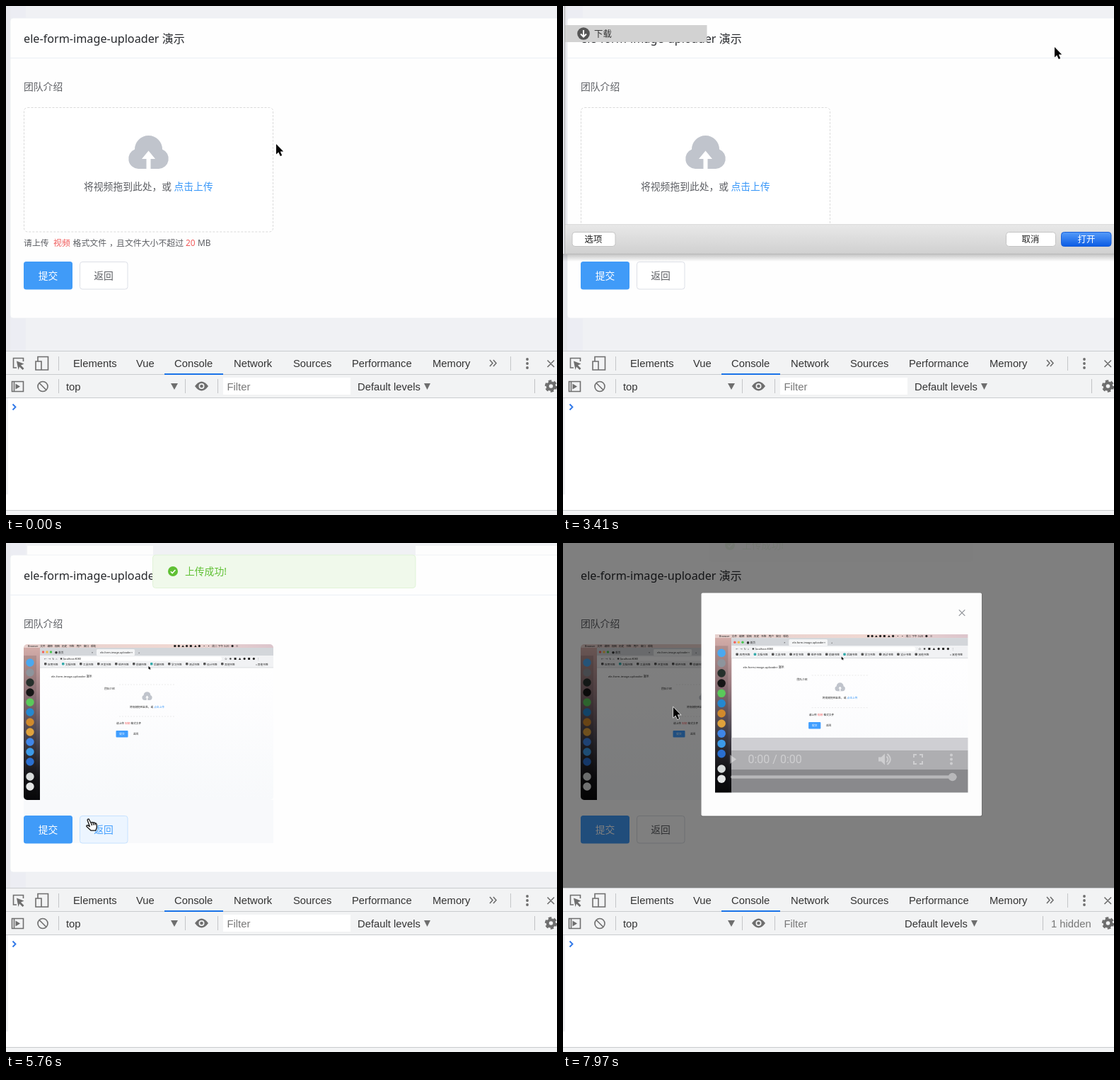
These frames come from a looping animation (779 px wide and 719 px high, 8000 ms). An HTML page:

```html
<!DOCTYPE html>
<html lang="zh-CN">
<head>
<meta charset="utf-8">
<title>ele-form-image-uploader 演示</title>
<style>
html, body { margin: 0; width: 100%; height: 100%; overflow: hidden; background: #fff; }
svg { display: block; width: 779px; height: 719px; }
text { font: 13.8px "Noto Sans", "Noto Sans CJK SC", "Noto Sans CJK", sans-serif; fill: #5c5e63; white-space: pre; }
.title { font-size: 16.2px; fill: #26282c; }
.hint { font-size: 11.9px; }
.blue { fill: #3a98f8; }
.red { fill: #f05a5a; }
.mid { text-anchor: middle; }
.dev text { font: 14.8px "Liberation Sans", Arial, sans-serif; fill: #333; }
.sheet text { font: 12.4px Inter, "Noto Sans CJK SC", "Noto Sans CJK", sans-serif; fill: #555; }
.sheet .ink { fill: #222; }
.line { fill: none; stroke: #6e6e6e; stroke-width: 1.6; }
.tiny text { font-size: 3.7px; fill: #222; }
.video text { font: 16px Roboto, sans-serif; fill: #fff; }
</style>
</head>
<body>
<svg viewBox="0 0 779 719">
<defs>
  <linearGradient id="wall" x2="0" y2="1">
    <stop stop-color="#d3aca8"/><stop offset=".3" stop-color="#9c7d82"/>
    <stop offset=".6" stop-color="#4c4852"/><stop offset=".85" stop-color="#151519"/><stop offset="1" stop-color="#08080a"/>
  </linearGradient>
  <linearGradient id="paper" x2="0" y2="1"><stop stop-color="#fff"/><stop offset=".4" stop-color="#fdfdfe"/><stop offset="1" stop-color="#f7f9fb"/></linearGradient>
  <linearGradient id="menu"><stop stop-color="#e6cfcc"/><stop offset=".6" stop-color="#f0d8d2"/><stop offset="1" stop-color="#dcc5cc"/></linearGradient>
  <linearGradient id="shade" x2="0" y2="1">
    <stop stop-opacity="0"/><stop offset=".3" stop-opacity=".32"/><stop offset=".62" stop-opacity=".72"/><stop offset="1" stop-opacity=".94"/>
  </linearGradient>
  <linearGradient id="open" x2="0" y2="1"><stop stop-color="#559bf9"/><stop offset="1" stop-color="#0a5be4"/></linearGradient>
  <linearGradient id="bar" x2="0" y2="1"><stop stop-color="#e8e8e8"/><stop offset="1" stop-color="#d0d0d0"/></linearGradient>
  <linearGradient id="drop" x2="0" y2="1"><stop stop-opacity=".24"/><stop offset="1" stop-opacity="0"/></linearGradient>
  <clipPath id="round"><rect width="353" height="220" rx="5"/></clipPath>
  <g id="cloud">
    <path d="M-14.5 21.5A14.3 14.3 0 0 1-19.5-6A19.3 19.3 0 0 1 19.5-6A14.3 14.3 0 0 1 14.5 21.5Z" fill="#c0c4cc"/>
    <path d="M0-4L9.5 7.5H3V21.5H-3V7.5H-9.5Z" fill="#fff"/>
  </g>
  <g id="folder" fill="#ccc" stroke="#777">
    <path d="M21-5.5h5.5l2 2h9v9.5h-16.5z"/><path d="M21-1.5h16.5"/>
  </g>
  <g id="shot" class="tiny">
    <rect width="353" height="220" fill="url(#paper)"/>
    <rect y="4" width="23" height="216" fill="url(#wall)"/>
    <rect y="16" width="18" height="204" opacity=".12"/>
    <rect width="353" height="5" fill="url(#menu)"/>
    <rect x="23" y="5" width="330" height="11" fill="#d3d6da"/>
    <rect x="103" y="7" width="54" height="9" rx="1.5" fill="#f4f5f6"/>
    <rect x="23" y="16" width="330" height="17" fill="#f1f2f4"/>
    <rect x="58" y="17.5" width="222" height="6" rx="3" fill="#fff"/>
    <path d="M23 33H353" stroke="#d4d6d9" stroke-width=".8"/>
    <circle cx="27.5" cy="11" r="1.7" fill="#f4605a"/><circle cx="33" cy="11" r="1.7" fill="#f6bd3f"/><circle cx="38.5" cy="11" r="1.7" fill="#45c54d"/>
    <text x="6" y="4">Browser   文件   编辑   视图   历史   书签   用户   窗口   帮助</text>
    <text x="212" y="4">■  ●  ▲  ●  ■   ▲  ●   ▪   ▪   周二 下午 3:20   ●   ≡</text>
    <circle cx="46" cy="11.7" r="1.8" fill="#333"/><text x="49" y="13">首页</text>
    <text x="96" y="13">×</text><text x="108" y="13">ele-form-image-uploader</text><text x="152" y="13">×</text><text x="162" y="13">+</text>
    <text x="29" y="22">←  →  ↻  ⌂    ◉ localhost:8080</text>
    <text x="284" y="22">☆   ◉   ■   ▲   ●   ■   ●   ⋮</text>
    <g id="marks"></g>
    <g id="dock"></g>
    <path d="M176.500 31v4.500l1-1 1 1.500 .8-.4-.8-1.500h1.300z"/>
    <text x="39" y="47" style="font-size:4.1px">ele-form-image-uploader 演示</text>
    <text x="114" y="64">团队介绍</text>
    <path d="M135 57H215M135 102H215" stroke="#ddd" stroke-width=".6" stroke-dasharray="2 2"/>
    <use href="#cloud" transform="translate(174.500 73.500) scale(.25)"/>
    <text x="174.500" y="90" class="mid">将视频拖到此处，或 <tspan class="blue">点击上传</tspan></text>
    <text x="131" y="113">请上传 <tspan class="red">视频</tspan> 格式文件</text>
    <rect x="130.500" y="122" width="17" height="9.500" rx="1" fill="#409eff"/>
    <text x="139" y="128" class="mid" style="fill:#fff">提交</text>
    <text x="158.500" y="128" class="mid">返回</text>
  </g>
</defs>

<g id="page">
  <g id="back">
    <rect width="779" height="487" fill="#f0f1f4"/>
    <rect width="28" height="487" fill="#ecedf3"/>
    <rect width="6" height="487" fill="#e7e8ec"/>
    <g id="residue" fill="#fdfdfd"><rect x="30" y="4" width="178" height="13"/><rect x="579" y="4" width="200" height="13"/></g>
    <rect id="card" x="6" y="17" width="790" height="424" rx="4" fill="#fefefe" stroke="#ebeef2" stroke-width=".8"/>
    <path d="M6 73.500H779" stroke="#ebeef5"/>
  </g>
  <rect id="plain" width="779" height="487" fill="#fff"/>
  <text class="title" x="25" y="52">ele-form-image-uploader <tspan style="font-size:16px">演示</tspan></text>
  <text x="25" y="119">团队介绍</text>
  <rect id="drag" x="25.500" y="143.500" width="352" height="175.500" rx="5" fill="#fff" stroke-dasharray="3 2"/>
  <g id="pick">
    <use href="#cloud" x="201.500" y="208.500"/>
    <text x="110" y="260">将视频拖到此处，或</text><text x="237.500" y="260" class="blue">点击上传</text>
    <text class="hint" x="25" y="339">请上传</text><text class="hint red" x="67" y="339">视频</text>
    <text class="hint" x="94.500" y="339">格式文件</text><text class="hint" x="146" y="339">，</text>
    <text class="hint" x="156" y="339">且文件大小不超过</text><text class="hint red" x="254" y="339">20</text><text class="hint" x="271" y="339">MB</text>
  </g>
  <g id="ring" fill="none" stroke-width="6" transform="rotate(-90 201.500 225)">
    <circle cx="201.500" cy="225" r="57.500" stroke="#e5e9f2"/>
    <circle id="arc" cx="201.500" cy="225" r="57.500" stroke="#38a0f8" stroke-linecap="round" pathLength="100"/>
  </g>
  <text id="pct" class="mid" x="201.300" y="232" style="font-size:16.200px"></text>
  <g id="thumb">
    <rect id="pale" x="25" y="363" width="353" height="61" fill="#f8f9fb"/>
    <g transform="translate(25 143)" clip-path="url(#round)"><use href="#shot"/></g>
  </g>
  <g id="foot">
    <rect x="25" y="361" width="69" height="39.500" rx="3.500" fill="#409bf8"/>
    <text class="mid" x="59.500" y="386" style="fill:#fff;font-weight:500">提交</text>
    <rect id="ret" x="104.500" y="361.500" width="67.500" height="38.500" rx="3.500"/>
    <text id="retText" class="mid" x="138" y="386">返回</text>
  </g>
  <g id="cover"><rect x="208" y="32" width="371" height="32" fill="#fff"/></g>
  <g id="toast">
    <rect id="toastBox" x="207.500" y="17" width="371.500" height="46.500" rx="4"/>
    <circle cx="236" cy="40" r="7" fill="#5fc033"/><path d="M232.800 40.200l2.400 2.400 4.200-4.600" fill="none" stroke="#fff" stroke-width="1.500"/>
    <text x="253" y="45" style="fill:#5fc033;font-weight:500">上传成功!</text>
  </g>
</g>
<rect id="dim" width="779" height="487"/>

<g id="modal">
  <rect x="195" y="70" width="398" height="317" rx="3" opacity=".12"/>
  <rect x="195.500" y="70.500" width="396.500" height="315" rx="2" fill="#fdfdfd"/>
  <path d="M559.800 94.300l8.500 8.500m0-8.500l-8.500 8.500" stroke="#909399" stroke-width="1.200"/>
  <use href="#shot" transform="translate(215 129) scale(1.0125 1.016)"/>
  <rect id="tint" x="215" y="267" width="357.500" height="85.500" fill="url(#shade)"/>
  <g id="bands"><rect x="238" y="275" width="334.500" height="18" fill="#cfcfd3"/><rect x="238" y="293" width="334.500" height="27" fill="#aeaeb1"/><rect x="238" y="320" width="334.500" height="32.500" fill="#89898c"/></g>
  <g id="ctl" class="video" fill="#fff">
    <path id="pause" d="M233 299h4v13h-4zm7.500 0h4v13h-4z"/>
    <path id="play" d="M236 299v13l9-6.500z"/>
    <text x="261.500" y="310.500">0:00 / 0:00</text>
    <path d="M446 302.500h4l5-5v16l-5-5h-4z"/><path d="M457.500 301.500q4 4 0 8M458.500 298q8.500 7.500 0 15" fill="none" stroke="#fff" stroke-width="2"/>
    <path d="M496 303v-4h4m4 0h4v4m0 5v4h-4m-4 0h-4v-4" fill="none" stroke="#fff" stroke-width="2"/>
    <circle cx="549" cy="299.500" r="2"/><circle cx="549" cy="305.500" r="2"/><circle cx="549" cy="311.500" r="2"/>
    <rect x="237" y="328.500" width="320" height="4" rx="2" opacity=".6"/>
    <rect id="played" x="237" y="328.500" height="4" rx="2"/><circle id="knob" cy="330.500" r="5.800"/>
  </g>
</g>

<g id="sheet" class="sheet">
  <rect x="0" y="402" width="779" height="11" fill="url(#drop)"/>
  <g id="sheetBody">
    <rect width="779" height="402" fill="#f4f4f4"/><rect x="204" y="4" width="575" height="357" fill="#fff"/>
    <path d="M3 4.500H779M204.500 4V361" stroke="#d4d4d4" fill="none"/>
    <text x="12" y="21" style="font-size:11px;font-weight:600;fill:#7a7a7a">个人收藏</text>
    <g id="places"></g>
  </g>
  <rect x="3" y="79" width="200.500" height="24" fill="#d2d2d2"/>
  <g transform="translate(0 91)"><circle cx="29" r="8.800" fill="#555"/><path d="M29-5V4m-4-3.500l4 4 4-4" fill="none" stroke="#fff" stroke-width="2"/><text x="44" y="4.800" style="fill:#333">下载</text></g>
  <rect id="sheetBar" x="3" y="361" width="776" height="41.500"/>
  <path d="M3 360.700H779" stroke="#d6d6d6"/><path d="M2.500-30V402" stroke="#aaa"/>
  <path d="M3 402.300H779" stroke="#b8b8b8"/>
  <g fill="#fff" stroke="#c4c4c4"><rect x="13" y="371.500" width="61" height="20" rx="4"/><rect x="626.500" y="371.500" width="70" height="20" rx="4"/><rect id="openBtn" x="704.500" y="371.500" width="70.500" height="20" rx="4"/></g>
  <text class="mid ink" x="43" y="386">选项</text><text class="mid ink" x="661" y="386">取消</text><text id="openText" class="mid" x="740" y="386">打开</text>
</g>

<g class="dev">
  <rect y="487" width="779" height="232" fill="#f2f3f4"/><rect y="554" width="779" height="158" fill="#fff"/>
  <rect y="554" width="3" height="136" fill="#f0f1f3"/>
  <path d="M0 487.500H779M0 520.500H779M0 553.500H779M0 712.500H779" stroke="#c9cbce"/>
  <rect x="224" y="519" width="83" height="2" fill="#1a73e8"/>
  <g id="tabs"></g>
  <path d="M74.500 495V515M713.500 495V515M74.500 527V547M253.500 527V547M299.500 527V547" stroke="#c4c6c8"/>
  <path class="line" d="M15 511H10.500V497.500H24.500V502"/><path d="M15 501.500l10.500 4-4.500 2 4.500 4.500-2 2-4.500-4.500-1.500 4.500z" fill="#6e6e6e"/>
  <path class="line" d="M45 502V495.500H59.500V514H50M42 502H50V514H42Z"/>
  <path class="line" d="M684 500l4 4.500-4 4.500M689 500l4 4.500-4 4.500M765.500 500.500l9.500 9.500m0-9.500l-9.500 9.500"/>
  <g fill="#6e6e6e"><circle cx="737" cy="499" r="1.900"/><circle cx="737" cy="505" r="1.900"/><circle cx="737" cy="511" r="1.900"/>
    <path d="M13.500 533.500v8l6.500-4z"/><path d="M233 533h10l-5 9z"/>
    <path d="M267 537q9.500-13 19 0-9.500 13-19 0z"/><circle cx="276.500" cy="537" r="4" fill="#f2f3f4"/><circle cx="276.500" cy="537" r="2.300"/></g>
  <path class="line" d="M8.500 530.500H24.500V544.500H8.500ZM11.500 530.500V544.500"/>
  <circle class="line" cx="52" cy="537.500" r="7" stroke-width="2"/><path class="line" d="M47 532.500l10 10"/>
  <text x="85" y="543">top</text>
  <rect id="filter" x="307" y="525" width="180" height="24" fill="#fff"/><text x="312.500" y="543" style="fill:#777">Filter</text>
  <g id="levels"><text x="497" y="543">Default levels</text><path d="M591 533h9l-4.500 9z" fill="#6e6e6e"/></g>
  <path id="sep" stroke="#c0c2c4"/><text id="hidden" x="690" y="543" style="fill:#777">1 hidden</text>
  <g fill="none" stroke="#6e6e6e"><circle cx="770.500" cy="537" r="4.800" stroke-width="4"/><circle cx="770.500" cy="537" r="7.500" stroke-width="2.500" stroke-dasharray="4.500 3.350"/></g>
  <path d="M9.500 562.500l4 4-4 4" fill="none" stroke="#3078e8" stroke-width="1.900"/>
</g>

<path id="arrow" d="M0 0V14.500L3.300 11.500 5.800 17 8.200 16 5.800 10.600H10.200Z" stroke="#fff" stroke-width="1.200" paint-order="stroke"/>
<path id="hand" d="M4.500 9L2.200 2.800Q2 .6 4.200 1L7.200 6.500Q8.500 4.600 10 6.200 11.500 4.800 12.700 6.800 14.700 6 15.300 9V13L13.800 17.200H7.200L1 11.600Q.2 9.600 2.400 9.600L5.300 11.500ZM7.200 6.500L8.500 10M10 6.200L11 9.500M12.700 6.800L13.200 9.500" fill="#fff" stroke="#111" stroke-width="1.300" stroke-linejoin="round"/>
</svg>
<script>
const LOOP = 8000;
const $ = id => document.getElementById(id);
const show = (id, on) => { $(id).style.display = on ? "" : "none"; };
const set = (id, attrs) => { for (const k in attrs) $(id).setAttribute(k, attrs[k]); };

// Each row: start time, then the values held until the next row
const cursor = [
  [0, 382, 195], [150, 318, 232], [290, 263, 248, 1], [1040, 300, 222], [1190, 345, 190], [1340, 385, 158],
  [1490, 409, 138], [1640, 440, 120], [1790, 475, 104], [1940, 505, 92], [2080, 526, 82],
  [2230, 560, 76], [2380, 604, 69], [2530, 648, 63], [2680, 680, 60], [2820, 695, 58],
  [3560, 690, 64], [3700, 670, 75], [3850, 640, 90], [4590, 496, 141], [4740, 484, 150], [4890, 455, 175],
  [5040, 400, 220], [5180, 320, 275], [5320, 235, 335], [5460, 165, 375], [5610, 122, 390, 1],
  [5760, 113, 389, 1], [5910, 126, 365], [6060, 146, 328, 1], [6200, 162, 296, 1], [6350, 172, 270, 1],
  [6500, 176, 258, 1], [6790, 179, 258], [7090, 176, 254], [7240, 170, 247], [7520, 162, 239], [7820, 156, 232]
];
const slide = [[0, -500], [1040, -290], [1190, -120], [1340, -20], [1490, 0], [3410, -52], [3560, -230], [3700, -500]];
const percent = [[0, 0], [4590, 45], [4740, 62], [4890, 83], [5040, 100]];
const toast = [[0, 0, 0], [5180, -8, .4], [5320, -3, .8], [5460, 0, 1], [7520, -8, .8], [7670, -20, .45], [7820, -37, .1]];
const seek = [[0, 0], [7090, .12], [7240, .3], [7390, .5], [7540, .7], [7680, .88], [7820, .98]];
const at = (rows, t) => rows.findLast(r => r[0] <= t);

$("tabs").innerHTML = [["Elements", 95], ["Vue", 184], ["Console", 238], ["Network", 322], ["Sources", 406], ["Performance", 489], ["Memory", 603]]
  .map(([s, x]) => `<text x="${x}" y="510">${s}</text>`).join("");

const glyphs = {
  0: '<path d="M22 5L29-7 36 5M20 2H38" fill="none" stroke="#666" stroke-width="1.7"/>',
  1: '<rect x="21" y="-6" width="16" height="12" rx="1" fill="#bbb" stroke="#666"/><path d="M23 3.5H35" stroke="#666" stroke-dasharray="2 1"/>',
  3: '<path d="M21 0L29-7 37 0M23-1V7H35V-1M27.500 7V2H31V7" fill="none" stroke="#666" stroke-width="1.3"/>'
};
$("places").innerHTML = ["应用程序", "Desktop", "", "qiaolinwenyu", "web", "api", "admin", "spider", "league-vue", "board-wepy", "activity-wepy", "league-admin", "league-uniapp"]
  .map((s, i) => s && `<g transform="translate(0 ${40 + 25.5 * i})">${glyphs[i] || '<use href="#folder"/>'}<text x="44" y="4.8">${s}</text></g>`).join("");

$("dock").innerHTML = ["#4aa8f0", "#8d949c", "#26302c", "#151515", "#5ac95a", "#2488d0", "#d18a2c", "#e0a23c", "#3f86e8", "#3c9ae8", "#2a6fd0", "#d8dcdc", "#e4e6e6"]
  .map((c, i) => `<circle cx="9" cy="${26 + 14 * i + (i > 10 ? 7 : 0)}" r="5.7" fill="${c}"/>`).join("");
$("marks").innerHTML = ["应用", "文档", "工具", "开发", "组件", "前端", "后端", "学习", "测试", "设计", "其他"]
  .map((s, i) => `<rect x="${29 + 25 * i}" y="26" width="3.5" height="3.5" rx="1" fill="${i % 5 == 1 ? "#3aa" : "#555"}"/><text x="${34 + 25 * i}" y="29.5">${s}书签</text>`).join("")
  + '<text x="328" y="29.5">» 其他书签</text>';

function draw(t) {
  const busy = t >= 4590 && t < 5180, done = t >= 5180, dark = t >= 6790, late = t >= 6940, faded = t >= 7970;
  const hover = (t >= 150 && t < 1040) || busy, onBack = t >= 5610 && t < 5910;

  show("pick", t < 4590);
  show("drag", !done);
  set("drag", { stroke: hover ? "#409eff" : "#d9d9d9" });
  show("ring", busy);
  show("pct", busy);
  const p = at(percent, t)[1];
  $("pct").textContent = p + "%";
  set("arc", { "stroke-dasharray": p + " 200" });
  show("thumb", done);
  show("pale", t < 5910);
  show("residue", t >= 5610 && !dark);
  show("back", !late);
  show("plain", late);
  const dy = done ? 24 : busy ? -18 : 0;
  set("card", { height: 424 + dy });
  set("foot", { transform: `translate(0 ${dy})` });
  set("ret", { fill: onBack ? "#ecf5ff" : "#fff", stroke: onBack ? "#c6e2ff" : "#dcdfe6" });
  $("retText").style.fill = onBack ? "#409eff" : "";

  const [, ty, to] = at(toast, t);
  set("toast", { transform: `translate(0 ${ty})`, opacity: to });
  set("toastBox", { fill: late ? "#fbfcfb" : "#f0f9eb", stroke: late ? "#f0f2ee" : "#e1f3d8" });
  show("cover", t >= 5460 && !faded);

  set("dim", { opacity: late ? .5 : dark ? .3 : 0 });
  show("modal", dark);
  set("modal", { opacity: late ? 1 : .6, transform: `translate(0 ${late ? 0 : -10})` });
  show("tint", !faded);
  show("bands", faded);
  set("ctl", { opacity: faded ? .4 : 1 });
  const s = at(seek, t)[1], ended = s > .9;
  show("pause", !ended);
  show("play", ended);
  set("played", { width: 320 * s });
  set("knob", { cx: 237 + 320 * s });

  const y = at(slide, t)[1], ready = t >= 1940;
  show("sheet", y > -500);
  set("sheet", { transform: `translate(0 ${y})` });
  show("sheetBody", t < 3410);
  set("sheetBar", { fill: ready ? "url(#bar)" : "#f5f5f5" });
  set("openBtn", { fill: ready ? "url(#open)" : "#fafafa", stroke: ready ? "#1a60d8" : "#dcdcdc" });
  $("openText").style.fill = ready ? "#fff" : "#b8b8b8";

  show("filter", !late);
  show("hidden", late);
  set("levels", { transform: `translate(${late ? -14 : 0} 0)` });
  set("sep", { d: `M${late ? 678.5 : 747.5} 527V547` });

  const [, cx, cy, hand] = at(cursor, t);
  show("arrow", !hand);
  show("hand", hand);
  set(hand ? "hand" : "arrow", { transform: `translate(${cx} ${cy})` });
}

function tick() {
  draw(performance.now() % LOOP);
  requestAnimationFrame(tick);
}
tick();
</script>
</body>
</html>
```
